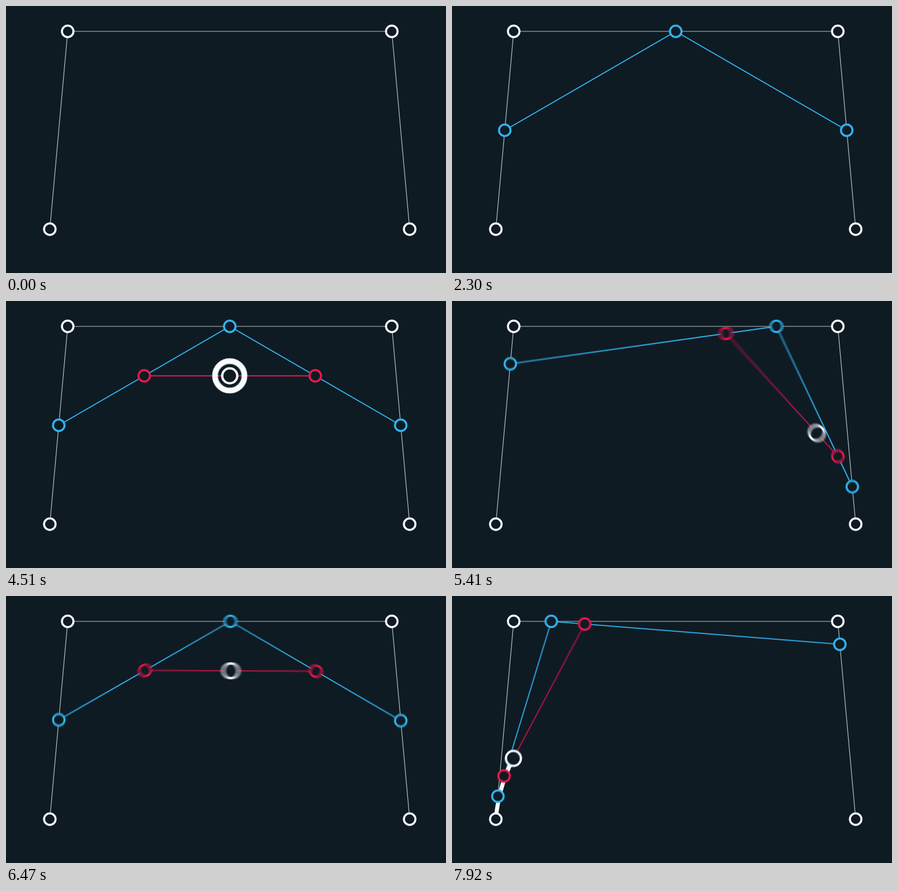
These frames come from a looping animation (763x463 px, 8 s). An HTML page with a canvas:

```html
<!DOCTYPE html>
<html lang="en">
<head>
<meta charset="utf-8">
<title>Bézier construction</title>
<style>
html, body { margin: 0; width: 100%; height: 100%; overflow: hidden; background: #0f1b23; }
canvas { display: block; }
</style>
</head>
<body>
<canvas id="stage" width="763" height="463"></canvas>
<script>
const W = 763, H = 463, LOOP = 8000;
const STEP = 88.7, LAST_STEP = 89;
const SHUTTER = 10, SAMPLES = 6;
const BG = '#0f1b23', WHITE = '#f8fbfd', EDGE = '#b9c2c7', BLUE = '#32b3f0', RED = '#ec174f';
const CONTROL = [[76, 387], [107, 44], [669, 44], [700, 387]];

const stage = document.getElementById('stage').getContext('2d');
const buffer = document.createElement('canvas');
buffer.width = W;
buffer.height = H;
const ctx = buffer.getContext('2d');

const clamp = x => Math.min(1, Math.max(0, x));
const ease = x => (1 - Math.cos(Math.PI * x)) / 2;
const progress = (time, start, duration) => clamp((time - start) / duration);
const mix = (a, b, t) => [a[0] + (b[0] - a[0]) * t, a[1] + (b[1] - a[1]) * t];
const reduce = (points, t) => points.slice(1).map((p, i) => mix(points[i], p, t));
const curvePoint = t => reduce(reduce(reduce(CONTROL, t), t), t)[0];

// Each move: start, duration, from, to
const MOVES = [
  [2400, 280, .5, 1], [2680, 400, 1, 0], [3080, 280, 0, .5],
  [4975, 754, .5, 1], [5796, 1362, 1, 0], [7250, 2914, 0, 1]
];
const TRACE_START = 7250;

function parameterAt(time) {
  let value = .5;
  for (const [start, duration, from, to] of MOVES) {
    if (time >= start) value = from + (to - from) * ease(progress(time, start, duration));
  }
  return value;
}

function polyline(points, color, width, alpha = 1) {
  ctx.globalAlpha = alpha;
  ctx.strokeStyle = color;
  ctx.lineWidth = width;
  ctx.beginPath();
  points.forEach(p => ctx.lineTo(...p));
  ctx.stroke();
  ctx.globalAlpha = 1;
}

function circle([x, y], radius, color, width, fill) {
  ctx.beginPath();
  ctx.arc(x, y, radius, 0, 2 * Math.PI);
  if (fill) {
    ctx.fillStyle = fill;
    ctx.fill();
  }
  ctx.strokeStyle = color;
  ctx.lineWidth = width;
  ctx.stroke();
}

const ring = (p, color, radius = 10, width = 3.5) => circle(p, radius, color, width, BG);

function pulse(points, color, u) {
  if (u <= 0 || u >= 1) return;
  const radius = 13 + 25 * (1 - (1 - u) ** 2);
  points.forEach(p => circle(p, radius, color, 14 * (1 - u)));
}

// Draws every segment of a chain up to the same fraction
function links(points, color, grown, alpha) {
  if (grown <= 0) return;
  for (let i = 1; i < points.length; i++) {
    polyline([points[i - 1], mix(points[i - 1], points[i], grown)], color, 2, alpha);
  }
}

function drawScene(time) {
  const t = parameterAt(time);
  const blue = reduce(CONTROL, t), red = reduce(blue, t), tip = reduce(red, t)[0];
  const fade = clamp(.1 + 7 * Math.min(t, 1 - t));
  const showBlue = time > 820, showRed = time > 3665, showTip = time > 4462;

  ctx.fillStyle = BG;
  ctx.fillRect(0, 0, W, H);
  polyline(CONTROL, EDGE, 1.2);
  links(blue, BLUE, ease(progress(time, 1510, 760)), fade);
  links(red, RED, ease(progress(time, 3665, 220)), fade * (time > 4975 ? .8 : 1));

  if (time > TRACE_START) {
    const pieces = 40;
    polyline(Array.from({ length: pieces + 1 }, (_, i) => curvePoint(t * i / pieces)), WHITE, 7);
  }
  if (showBlue) {
    pulse(blue, BLUE, progress(time, 820, 300));
    blue.forEach(p => ring(p, BLUE));
  }
  if (showRed) {
    pulse(red, RED, progress(time, 3665, 210));
    red.forEach(p => ring(p, RED));
  }
  CONTROL.forEach(p => ring(p, WHITE));
  if (showTip) {
    pulse([tip], WHITE, progress(time, 4462, 210));
    ring(tip, WHITE, 13, 4);
  }
}

// Averages several moments to give motion blur
function render(time) {
  for (let k = 0; k < SAMPLES; k++) {
    drawScene(time + SHUTTER * ((k + .5) / SAMPLES - .5));
    stage.globalAlpha = 1 / (k + 1);
    stage.drawImage(buffer, 0, 0);
  }
}

let shown = -1;
const origin = performance.now();
function tick() {
  const time = (performance.now() - origin) % LOOP;
  const step = Math.min(LAST_STEP, Math.floor((time + 20) / STEP));
  if (step !== shown) {
    shown = step;
    render(step * STEP);
  }
  requestAnimationFrame(tick);
}
tick();
</script>
</body>
</html>
```
